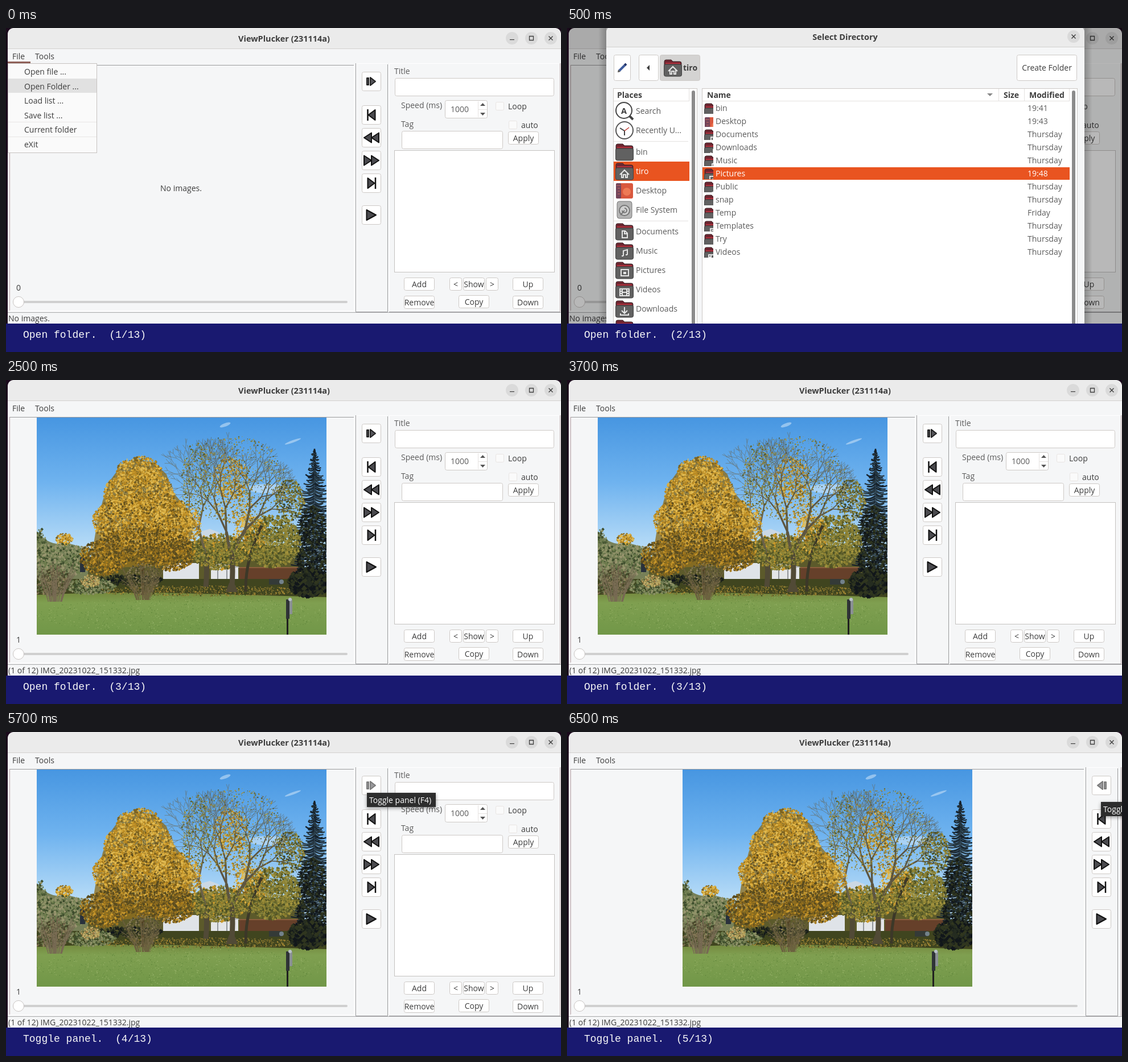
Recreate the animation shown at these times as an HTML page. Size 975 by 570 pixels, loop 8000 ms.

```html
<!DOCTYPE html>
<html lang="en">
<head>
<meta charset="utf-8">
<title>Photo viewer tour</title>
<style>
html, body { margin: 0; width: 100%; height: 100%; overflow: hidden; background: #1b0a1c; }
#stage { display: block; width: 975px; height: 570px; }
text { font: 14px "Open Sans", "Noto Sans", sans-serif; fill: #3d3d3d; white-space: pre; }
.bold { font-weight: 700; }
.title { font-weight: 700; font-size: 14.5px; }
.soft { fill: #5c5c5c; }
.white { fill: #fff; }
.mid { text-anchor: middle; }
.caption { font: 18px "Liberation Mono", monospace; fill: #f8f8f8; }
.tip { filter: drop-shadow(0 2px 3px #0006); }
</style>
</head>
<body>
<svg id="stage" viewBox="0 0 975 570"></svg>
<script>
const text = (x, y, s, cls = '') => `<text x="${x}" y="${y}" class="${cls}">${s.replace(/</g, '&lt;')}</text>`;
const rect = (x, y, w, h, fill, more = '') => `<rect x="${x}" y="${y}" width="${w}" height="${h}" fill="${fill}" ${more}/>`;
const box = (x, y, w, h, fill = '#fff', stroke = '#cdc9c6', r = 3) =>
  rect(x + .5, y + .5, w - 1, h - 1, fill, `rx="${r}" stroke="${stroke}"`);
const path = (d, fill, more = '') => `<path d="${d}" fill="${fill}" ${more}/>`;
const line = (d, stroke, w = 1) => path(d, 'none', `stroke="${stroke}" stroke-width="${w}"`);
const disc = (x, y, r, fill, more = '') => `<circle cx="${x}" cy="${y}" r="${r}" fill="${fill}" ${more}/>`;
const move = (x, y, s) => `<g transform="translate(${x} ${y})">${s}</g>`;
const button = (x, y, w, h, label) => box(x, y, w, h) + text(x + w / 2, y + h / 2 + 5, label, 'mid');

// ---------- Photo ----------
let seed = 7;
function rnd() {
  seed = (seed * 1664525 + 1013904223) % 4294967296;
  return seed / 4294967296;
}
const fix = v => v.toFixed(1);

// Leaves scattered in an ellipse, in batches so that the colours mix
function leaves(cx, cy, rx, ry, n, size, colors) {
  let out = '';
  for (let k = 0; k < colors.length * 3; k++) {
    let d = '';
    for (let i = 0; i < n / colors.length / 3; i++) {
      const a = rnd() * 6.283, r = Math.sqrt(rnd()), s = size * (.5 + rnd());
      d += `M${fix(cx + rx * r * Math.cos(a))} ${fix(cy + ry * r * Math.sin(a) - s)}l${fix(s)} ${fix(s)} ${fix(-s)} ${fix(s)} ${fix(-s)} ${fix(-s)}z`;
    }
    out += path(d, colors[k % colors.length]);
  }
  return out;
}

function limb(x, y, a, len, w, color) {
  const x2 = x + len * Math.cos(a), y2 = y + len * Math.sin(a);
  let out = line(`M${fix(x)} ${fix(y)}L${fix(x2)} ${fix(y2)}`, color, Math.max(w, .5).toFixed(2));
  if (len > 10) for (const side of [-1, 1])
    out += limb(x2, y2, a + side * (.1 + rnd() * .5), len * (.68 + rnd() * .2), w * .66, color);
  return out;
}

function conifer(x, top, base) {
  let s = '';
  for (let y = top; y < base; y += 2.5) {
    const reach = 3 + Math.min(y - top, 130) * .27;
    for (const side of [-1, 1]) {
      const w = side * reach * (.45 + rnd() * .65);
      s += line(`M${x} ${fix(y)}q${fix(w * .5)} ${fix(5 + rnd() * 4)} ${fix(w)} ${fix(rnd() * 6)}`, rnd() < .5 ? '#16212a' : '#26363f', 2.2);
    }
  }
  return s;
}

function shrub(x, y, w, h, color) {
  let d = '';
  for (let i = 0; i < 44; i++) {
    const a = rnd() * 2 - 1;
    d += `M${fix(x + a * 12)} ${y}q${fix(a * w * .3)} ${fix(-h * .4)} ${fix(a * w)} ${fix(-h * (.4 + rnd() * .6))}`;
  }
  return line(d, color, .9);
}

function photo() {
  const gold = ['#a67a1c', '#c8982c', '#dcb040', '#7d6320', '#ba8a22', '#e2bc54'];
  const shade = ['#a67a1c', '#c8982c', '#6a5420', '#8d6c1e', '#54491f'];
  const olive = ['#68692c', '#82803a', '#a2933e', '#4d5124', '#8f8232'];
  const green = ['#51623a', '#6c7b4c', '#869062', '#3d4c2c', '#8f9168'];
  const twigs = ['#75694a', '#565236', '#8b7f58', '#444428'];
  const night = ['#171d18', '#252c20', '#11161a', '#30361f'];
  let s = rect(0, 0, 509, 382, 'url(#sky)');
  s += '<g fill="#dcecfa" opacity=".5"><ellipse cx="331" cy="13" rx="10" ry="3" transform="rotate(-20 331 13)"/>' +
    '<ellipse cx="450" cy="42" rx="15" ry="2" transform="rotate(-20 450 42)"/><ellipse cx="405" cy="125" rx="34" ry="8"/></g>';
  // Far growth, sheds and fence
  s += path('M0 200Q20 225 45 222T90 240V290H0z', '#778058') + leaves(48, 214, 15, 10, 110, 2, gold) +
    leaves(7, 225, 9, 30, 130, 2, green) + leaves(45, 250, 58, 28, 700, 2, green.concat('#9a9670'));
  s += path('M90 250L290 215 470 230V290H90z', '#5c5a2b') + rect(76, 246, 9, 26, '#29313c');
  s += path('M222 288V262L250 256H285V288z', '#dfe3e8') + path('M290 200l14-4 16 6v14h-30z', '#cbd8e4');
  s += rect(306, 262, 48, 26, '#e4e6e8') + path('M302 264l26-10 30 10z', '#b5b8bc') + line('M318 266v22M334 266v22', '#777c80', 1.5);
  s += rect(356, 264, 104, 20, '#66402a') + line('M356 264H460', '#8b5e3e', 2) + rect(0, 284, 509, 36, '#40451f');
  s += path('M0 312Q130 306 250 309T509 316V382H0z', 'url(#lawn)');
  s += leaves(290, 305, 190, 9, 1100, 1, ['#93792e', '#b18f36', '#6d6a2c', '#3c3f1c', '#7d7030']);
  s += rect(408, 284, 22, 10, '#343a37') + disc(430, 289, 4, '#72818a');
  // Dark conifer
  s += conifer(488, 55, 300) + leaves(485, 230, 28, 75, 700, 2.2, night) + leaves(478, 290, 36, 26, 500, 3, night);
  // Bare trees with sparse foliage
  s += leaves(342, 106, 32, 36, 420, 1.5, gold) + leaves(345, 150, 34, 36, 260, 1.6, gold);
  s += leaves(414, 218, 50, 46, 1500, 2, olive) + leaves(320, 236, 48, 32, 900, 2, olive.concat(gold[1]));
  s += leaves(375, 205, 30, 34, 350, 1.8, gold) + leaves(445, 145, 26, 36, 420, 1.6, olive.concat('#33402c'));
  s += limb(342, 240, -1.05, 48, 6, '#5d5540') + limb(342, 250, -1.75, 50, 5, '#5d5540') + limb(297, 240, -1.85, 46, 4, '#6a6148');
  s += line('M342 306Q346 270 342 236M297 298Q300 270 297 238', '#514a36', 9) + line('M367 306Q366 250 395 190', '#3c3828', 5);
  s += path('M332 307l6-16h9l6 16z', '#514a36');
  s += leaves(345, 110, 92, 78, 1100, 1.1, olive.concat('#a8923c', '#756a42')) + leaves(280, 110, 26, 66, 330, 1.2, olive);
  s += leaves(400, 228, 58, 28, 500, 1.7, olive) + leaves(318, 245, 40, 20, 320, 1.7, olive);
  // Golden tree
  s += line('M186 312V160', '#4d3a1c', 6);
  s += path('M178 74L206 80 228 100 238 130 262 158 278 186 266 226 250 256 200 262 132 264 96 252 100 222 106 186 116 146 128 112 150 82z', '#8f7020', 'opacity=".8"');
  s += leaves(180, 96, 40, 28, 700, 1.7, gold) + leaves(180, 135, 62, 44, 1700, 1.8, gold) + leaves(186, 182, 88, 48, 2700, 1.9, gold);
  s += leaves(245, 190, 44, 44, 700, 1.8, gold) + leaves(188, 226, 84, 32, 1300, 1.9, shade);
  s += leaves(118, 246, 42, 32, 800, 1.9, shade) + leaves(236, 244, 40, 26, 700, 1.9, shade);
  s += leaves(185, 190, 70, 80, 420, 1.6, ['#5a4a1e', '#6e5a24']);
  // Shrubs, grass and post
  s += leaves(160, 286, 62, 9, 260, 2, night) + leaves(95, 297, 44, 14, 520, 1.8, green) + leaves(94, 288, 17, 11, 160, 1.4, ['#b6a35b', '#987843', '#c4b06c']);
  s += leaves(22, 290, 40, 24, 500, 1.8, green.concat(twigs));
  s += leaves(187, 284, 30, 28, 420, 1.4, twigs) + shrub(187, 321, 30, 70, '#6b5f40');
  s += leaves(32, 288, 24, 28, 300, 1.4, twigs) + shrub(32, 324, 25, 72, '#786a54');
  s += leaves(255, 348, 255, 33, 1500, .7, ['#8fae60', '#678c40', '#9ab46c', '#5e843a']);
  s += path('M439 321h3v61h-3z', '#20201f') + rect(438, 320, 6, 34, '#2e3236') + rect(444, 320, 5, 26, '#8a9094') + disc(445, 320, 3, '#bac2c8');
  return s;
}

// ---------- Main window ----------
const ink = 'stroke="#111" stroke-width="2" stroke-linejoin="round"';
const tri = (x1, x2, h) => path(`M${x1} ${-h}L${x2} 0L${x1} ${h}z`, '#4a4a4e', ink);
const bar = x => line(`M${x} -10V10`, '#111', 2.5);
const toggle = path('M-8-6h3v12h-3zM-2-7L7 0-2 7z', '#55555a', 'stroke="#222" stroke-width="2" stroke-linejoin="round"');
const icons = [
  [153, bar(-6.5) + tri(6.5, -5.5, 9)],
  [193, tri(0, -13, 8.5) + tri(13, 0, 8.5)],
  [233, tri(-13, 0, 8.5) + tri(0, 13, 8.5)],
  [273, tri(-6.5, 5.5, 9) + bar(7)],
  [329, tri(-8.5, 8, 9)]
];

function controls(mode) {
  let s = rect(614, 62, 361, 438, '#f5f6f7') + line('M614.5 62V499.5H670.5V64', '#9b9b9d') + line('M615.5 498V62.5H670', '#fff');
  const fade = mode ? .6 : 1, flip = mode === 2 ? -1 : 1;
  s += box(625, 77, 34, 34) + move(642, 94, `<g opacity="${fade}" transform="scale(${flip} 1)">${toggle}</g>`);
  for (const [y, icon] of icons) s += box(625, y - 17, 34, 34) + move(642, y, icon);
  return s;
}

function sidePanel() {
  const edge = '#e8e5e3';
  return line('M673.5 498V62.5H973', '#fff') + line('M673 499.5H973', '#9b9b9d') +
    text(682, 81, 'Title', 'soft') + box(683, 88, 280, 32) +
    text(694, 141, 'Speed (ms)', 'soft') + box(771, 127, 75, 32) + text(781, 148, '1000', 'soft') +
    line('M829.5 129V157M830 143.5H845', '#e6e3e1') + path('M833 137l4.500-5 4.500 5zM833 149l4.500 5 4.500-5z', '#555') +
    box(860, 130, 15, 15, '#fafafa', edge, 2) + text(882, 143, 'Loop') +
    text(694, 174, 'Tag', 'soft') + box(883, 163, 15, 15, '#fafafa', edge, 2) + text(905, 176, 'auto') +
    box(695, 181, 178, 32) + button(882, 182, 54, 23, 'Apply') + box(682, 215, 282, 215, '#fff', '#c4c2c0', 0) +
    button(699, 439, 54, 23, 'Add') + button(779, 439, 22, 23, '<') + button(803, 439, 38, 23, 'Show') +
    button(843, 439, 22, 23, '>') + button(890, 439, 54, 23, 'Up') + button(699, 471, 54, 23, 'Remove') +
    button(795, 470, 54, 23, 'Copy') + button(890, 471, 54, 23, 'Down');
}

function closeMark(x, y) {
  return disc(x, y, 11, '#dadada') + line(`M${x - 3.5} ${y - 3.5}l7 7m0-7l-7 7`, '#3d3d3d', 1.4);
}

function mainWindow(loaded, mode) {
  const wide = mode === 2 ? 297 : 0;
  let s = rect(3, 0, 972, 560, '#f5f6f7', 'rx="12"') + path('M3 37V12Q3 0 15 0H963Q975 0 975 12V37z', '#ebebeb') + line('M3 36.500H975', '#d2d0ce');
  s += text(488.5, 24, 'ViewPlucker (231114a)', 'title mid') + disc(889, 18, 11, '#dadada') + disc(923, 18, 11, '#dadada') + closeMark(957, 18);
  s += line('M885 20.500h8', '#3d3d3d', 1.2) + line('M919.500 14.500h7v7h-7z', '#3d3d3d', 1.3);
  s += text(11, 55, 'File') + text(51, 55, 'Tools');
  s += line(`M6 65.500H${611 + wide}`, '#9b9b9d') + line('M6.500 65V497', '#b7a3a6') + line(`M7 497.500H${611 + wide}.500V66`, '#fff');
  if (loaded) s += `<use href="#photo" x="${wide ? 203 : 54}" y="66"/>`;
  else s += text(271, 287, 'No images.');
  s += text(18, 462, loaded ? '1' : '0') + rect(22, 480, 578 + wide, 4, '#cfcfcf', 'rx="2"') + disc(22, 482, 9.5, '#fff', 'stroke="#c8c4c2"');
  s += move(wide, 0, controls(mode) + (wide ? '' : sidePanel()));
  s += line('M973.500 62V500', '#b7a3a6') + line('M3 500.500H975', '#a9a9ab');
  return s + text(4, 516, loaded ? '(1 of 12) IMG_20231022_151332.jpg' : 'No images.');
}

function fileMenu() {
  let s = rect(3, 59, 40, 3, '#8f6058') + box(3, 62, 157, 158, '#fafafa', '#c6c2c0', 0) + rect(4, 89, 155, 25, '#e1e1e1');
  s += line('M4 165.500H159M4 191.500H159', '#e9e7e6');
  ['Open file ...', 'Open Folder ...', 'Load list ...', 'Save list ...', 'Current folder', 'eXit']
    .forEach((t, i) => s += text(32, 82 + Math.round(i * 25.5), t));
  return s;
}

function tooltip(x, y) {
  return rect(x, y, 121, 25, '#2d2d2d', 'class="tip"') + text(x + 4, y + 18, 'Toggle panel (F4)', 'white');
}

// ---------- Folder dialog ----------
const marks = {
  home: 'M8 22l8-8 8 8M11 20v7h3v-5h4v5h3v-7',
  Documents: 'M12 15h5l4 4v8h-9zM16 15v5h5',
  Downloads: 'M16 13v10M11 19l5 5 5-5M9 24v3h14v-3',
  Music: 'M14 25v-9l7-2v9M11 25h3M18 23h3',
  Pictures: 'M10 15h13v11H10zM15 20h3v2h-3z',
  Public: 'M13 21l8-4M13 21l8 5M11 20v2M21 16v2M21 25v2',
  Templates: 'M11 15h9v11h-9zM13 18h6M13 21h6',
  Videos: 'M8 15h16v12H8zM12 15v12M20 15v12M12 21h8M8 19h4M8 23h4M20 19h4M20 23h4'
};

function folder(kind) {
  if (kind === 'Desktop') return rect(1, 3, 30, 27, '#d9583e', 'rx="3"') + rect(1, 3, 9, 27, '#73455a', 'rx="2"') +
    line('M2 7h7M4 12h4M4 17h4M4 22h4', '#c86a62') + disc(20, 18, 7, '#ee7a55');
  return path('M1 14V5Q1 2 4 2h9l3 3h12q3 0 3 3v6z', '#6e2530', 'stroke="#3b2a2c"') + line('M3 8h26', '#b0303c', 2) +
    rect(.5, 10, 31, 21, '#616161', 'rx="3" stroke="#414141"') + (marks[kind] ? line(marks[kind], '#e4e4e4', 2) : '');
}

function placeIcon(kind) {
  if (kind === 'Search') return line('M25 25l6 6', '#444', 4) + disc(15, 15, 14, '#fff', 'stroke="#444" stroke-width="2"') + text(15, 21, 'A', 'title mid');
  if (kind === 'Recently U...') return disc(16, 16, 15, '#fff', 'stroke="#555" stroke-width="2"') + line('M8 12l8 5v8', '#444', 2) + line('M16 17l8-6', '#c3392f', 1.5);
  if (kind === 'File System') return rect(3, 1, 26, 30, '#b4b4b4', 'rx="4" stroke="#777"') + disc(16, 17, 9, '#d0d0d0', 'stroke="#777" stroke-width="2"') +
    line('M16 13a4 4 0 1 1-4 4M9 25l7-8', '#777', 2);
  return folder(kind);
}

function dialog() {
  const user = 'tiro', orange = '#e95420';
  let s = rect(3, 0, 972, 520, '#000', 'opacity=".28"') + rect(55, 0, 14, 520, 'url(#shadeL)') + rect(909, 0, 14, 520, 'url(#shadeR)');
  s += rect(69, -4, 840, 540, '#f5f6f7', 'rx="12"') + path('M69 33V8Q69 0 77 -2H901Q909 0 909 8V33z', '#ebebeb') + line('M69 33.500H909', '#d2d0ce');
  s += text(488.5, 21, 'Select Directory', 'title mid') + closeMark(890, 15);
  s += box(82, 47, 30, 46) + line('M92 75l9-9', '#3c5a9c', 4) + line('M101 66l3-3', '#24356b', 4) + path('M89 78l1-5 4 4z', '#555');
  s += box(126, 47, 35, 46) + path('M145 65v10l-5-5z', '#3d3d3d');
  s += box(163, 47, 71, 46, '#d4d3d2', '#cdc9c6') + move(170, 54, folder('home')) + text(204, 75, user, 'bold') + button(790, 47, 106, 46, 'Create Folder');

  s += box(81, 106, 148, 430, '#fff', '#cdc9c6', 0) + text(88, 123, 'Places', 'bold') + line('M82 128.500H215M214.500 107V128M82 199.500H213M82 339.500H213', '#e4e2e0');
  s += rect(219, 110, 6, 420, '#8b8b8b', 'rx="3"') + rect(82, 235, 133, 34, orange);
  const places = [['Search', 151], ['Recently U...', 185], ['bin', 223], [user, 257], ['Desktop', 291], ['File System', 325],
    ['Documents', 363], ['Music', 397], ['Pictures', 431], ['Videos', 465], ['Downloads', 499], ['', 533]];
  for (const [name, y] of places)
    s += move(85, y - 21, placeIcon(name === user ? 'home' : name)) + text(121, y, name, name === user ? 'white' : 'soft');

  s += box(237, 106, 660, 430, '#fff', '#cdc9c6', 0) + line('M238 128.500H883M758.500 107V128M803.500 107V128M882.500 107V128', '#e4e2e0');
  s += text(246, 123, 'Name', 'bold') + text(767, 123, 'Size', 'bold') + text(812, 123, 'Modified', 'bold') + path('M738 115h10l-5 5z', '#888');
  s += rect(887, 110, 6, 420, '#8b8b8b', 'rx="3"') + rect(238, 245, 645, 22, orange);
  const when = { bin: '19:41', Desktop: '19:43', Pictures: '19:48', Temp: 'Friday' };
  ['bin', 'Desktop', 'Documents', 'Downloads', 'Music', 'Pictures', 'Public', 'snap', 'Temp', 'Templates', 'Try', 'Videos'].forEach((name, i) => {
    const y = 146 + 23 * i, cls = name === 'Pictures' ? 'white' : 'soft';
    s += `<svg x="241" y="${y - 15}" width="16" height="20">${folder(name)}</svg>` + text(261, y, name, cls) + text(809, y, when[name] || 'Thursday', cls);
  });
  return s;
}

// ---------- Scenes ----------
const scenes = [
  [0, 'Open folder.', mainWindow(false, 0) + fileMenu()],
  [500, 'Open folder.', mainWindow(false, 0) + dialog()],
  [2500, 'Open folder.', mainWindow(true, 0)],
  [4500, 'Toggle panel.', mainWindow(true, 1) + tooltip(634, 107)],
  [6500, 'Toggle panel.', mainWindow(true, 2) + tooltip(938, 123)]
];
const stop = (at, c, o = 1) => `<stop offset="${at}" stop-color="${c}" stop-opacity="${o}"/>`;
const fade = (id, dir, stops) => `<linearGradient id="${id}" x1="0" y1="0" ${dir}="1" ${dir === 'y2' ? 'x2="0"' : 'y2="0"'}>${stops}</linearGradient>`;
const stage = document.getElementById('stage');
stage.innerHTML = '<defs>' +
  fade('sky', 'y2', stop(0, '#4796e1') + stop(.3, '#6fb3ef') + stop(.6, '#b8dcf7')) +
  fade('lawn', 'y2', stop(0, '#75893f') + stop(.25, '#7f9f50') + stop(1, '#719748')) +
  fade('shadeL', 'x2', stop(0, '#000', 0) + stop(1, '#000', .22)) +
  fade('shadeR', 'x2', stop(0, '#000', .22) + stop(1, '#000', 0)) +
  `<symbol id="photo" width="509" height="382" viewBox="0 0 509 382">${photo()}</symbol></defs>` +
  scenes.map(([, note, art], i) => `<g class="scene">${art}${rect(0, 520, 975, 50, '#191970')}${text(30, 545, `${note}  (${i + 1}/13)`, 'caption')}</g>`).join('');
const groups = stage.querySelectorAll('.scene');

function draw() {
  const t = performance.now() % 8000;
  const now = scenes.filter(([start]) => start <= t).length - 1;
  groups.forEach((g, i) => g.style.display = i === now ? '' : 'none');
  requestAnimationFrame(draw);
}
draw();
</script>
</body>
</html>
```
